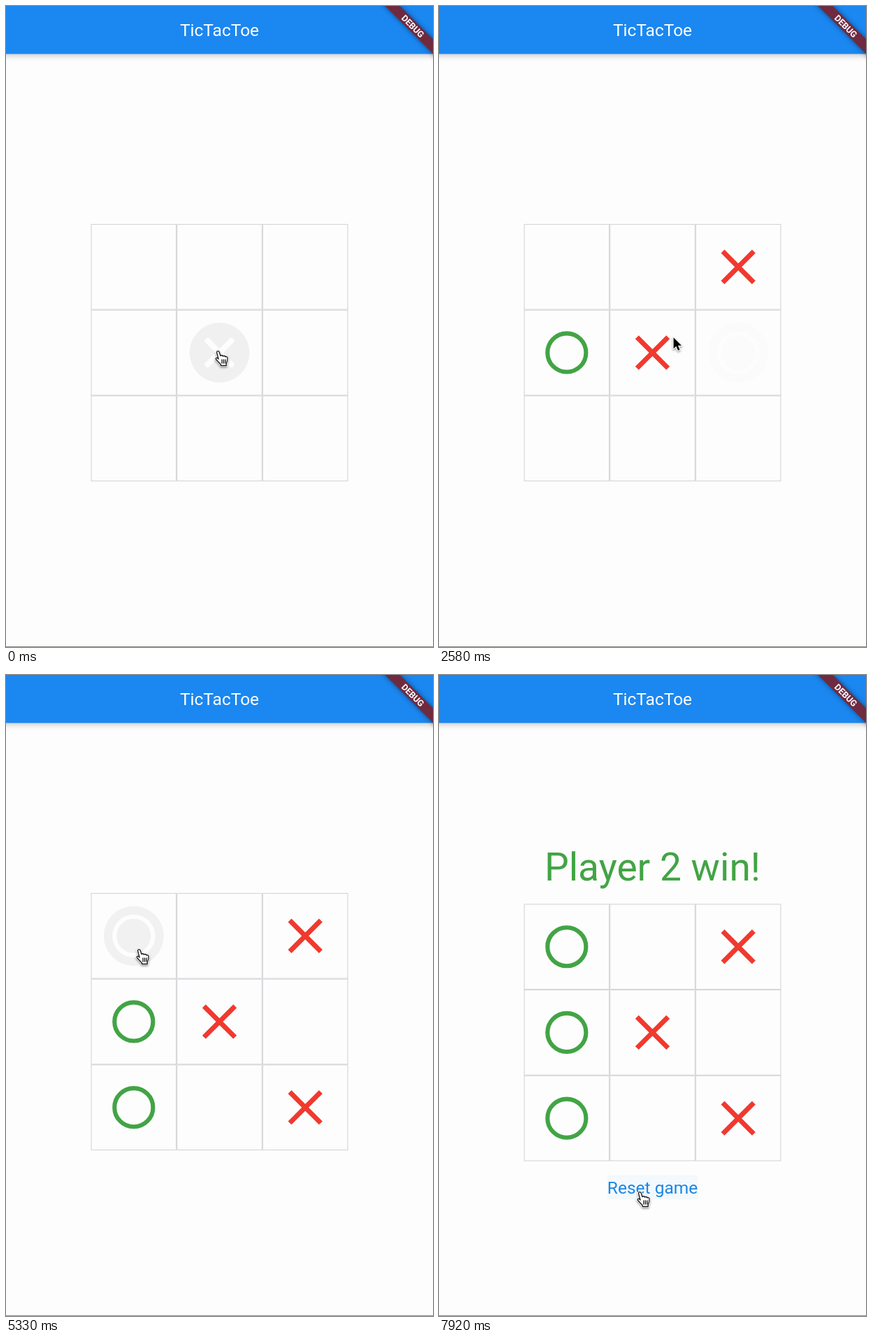
Recreate the animation shown at these times as an HTML page with a canvas. Size 611 by 917 pixels, loop 8 s.

```html
<!DOCTYPE html>
<html lang="en">
<head>
<meta charset="utf-8">
<title>TicTacToe</title>
<style>
html, body { margin: 0; width: 100%; height: 100%; overflow: hidden; background: #fdfdfd; }
canvas { display: block; }
</style>
</head>
<body>
<canvas id="stage" width="611" height="917"></canvas>
<script>
const ctx = document.getElementById('stage').getContext('2d');
const LOOP = 8000, FADE = 150, WIN = 5580;
const MID = 305.5, UNIT = 1.225, CELL = 122.7, LEFT = MID - 1.5 * CELL, TOP = 311.9;
const BG = '#fdfdfd', BLUE = '#1b87f0', RED = '#f0392f', GREEN = '#42a445';

// Moves alternate X and O: [time, cell]
const moves = [[250, 4], [1420, 3], [2250, 2], [4080, 6], [5000, 8], [WIN, 0]];

// Pointer glides between rests: [start, end, x, y]
const START = [303, 494];
const glides = [
  [380, 1000, 188, 520], [1500, 1830, 503, 393], [1920, 2170, 430, 390],
  [2330, 3000, 178, 654], [4080, 4500, 396, 640], [4500, 4750, 426, 626],
  [5000, 5250, 190, 393], [5750, 6580, 336, 298], [7000, 7760, 287, 740]
];

const hand = new Path2D('M-1.5 1.5C-1.5-.8 1.6-1 2.2 1L4 6.5C5 5.2 7 5.6 7.4 7C8.6 6 10.4 6.4 10.8 7.8' +
  'C12.4 7 14 8 14 9.6C14.2 13 13.4 15.5 12.2 17.5V20.5H4.5L4 18.5C2.5 16.5-.5 14-2.5 11.5' +
  'C-3.6 9.8-1.8 8.4-.2 9.8L1 11Z');
const knuckles = new Path2D('M6 12v5M8.5 12v5M11 12v5');
const arrow = new Path2D('M0 0V16L3.8 12.6L6.4 18.6L9 17.5L6.4 11.6H11.5Z');

// Each glide bows slightly upward, like a wrist movement
function pointerAt(t) {
  let [x, y] = START;
  for (const [from, to, x1, y1] of glides) {
    if (t < from) break;
    const k = Math.min(1, (t - from) / (to - from));
    x += (x1 - x) * k;
    y += (y1 - y) * k - 16 * Math.sin(Math.PI * k);
  }
  return [x, y];
}

// Board cell under the pointer, 'reset', or -1
function targetAt(t, board) {
  const [x, y] = pointerAt(t);
  if (t >= WIN) return Math.abs(x - MID) < 65 && Math.abs(y - 733) < 17 ? 'reset' : -1;
  const col = Math.floor((x - LEFT) / CELL), row = Math.floor((y - TOP) / CELL);
  const inside = col >= 0 && col < 3 && row >= 0 && row < 3;
  return inside && !board[row * 3 + col] ? row * 3 + col : -1;
}

// Share of the last FADE ms spent over a target gives its linear fade
function hoverLevel(t, target, board) {
  const steps = 30;
  let hits = 0;
  for (let i = 0; i < steps; i++) hits += targetAt(t - i * FADE / steps, board) === target;
  return hits / steps;
}

function disc(x, y, r) {
  ctx.beginPath();
  ctx.arc(x, y, r, 0, 2 * Math.PI);
}

function drawMark(mark, x, y, color, reach, width, cap = 'butt') {
  ctx.strokeStyle = color;
  ctx.lineWidth = width;
  ctx.lineCap = cap;
  if (mark === 'O') {
    disc(x, y, 22.5 * UNIT);
  } else {
    ctx.beginPath();
    for (const s of [-1, 1]) {
      ctx.moveTo(x - reach, y - reach * s);
      ctx.lineTo(x + reach, y + reach * s);
    }
  }
  ctx.stroke();
}

function label(text, x, y, size, color, weight = 400) {
  ctx.font = `${weight} ${size * UNIT}px Roboto, sans-serif`;
  ctx.textAlign = 'center';
  ctx.fillStyle = color;
  ctx.fillText(text, x, y);
}

function withShadow(alpha, blur, dy, draw) {
  ctx.save();
  ctx.shadowColor = `rgba(0,0,0,${alpha})`;
  ctx.shadowBlur = blur;
  ctx.shadowOffsetY = dy;
  draw();
  ctx.restore();
}

function drawChrome() {
  ctx.fillStyle = BG;
  ctx.fillRect(0, 0, 611, 917);
  ctx.fillStyle = '#8c8e84';
  ctx.fillRect(0, 916, 611, 1);
  withShadow(.22, 8, 2, () => {
    ctx.fillStyle = BLUE;
    ctx.fillRect(-20, -20, 651, 20 + 56 * UNIT);
  });
  label('TicTacToe', MID, 43, 20, '#fff');

  ctx.save();
  ctx.translate(611, 0);
  ctx.rotate(Math.PI / 4);
  withShadow(.5, 7, 0, () => {
    ctx.fillStyle = '#702a40';
    ctx.fillRect(-70, 33.6, 140, 12 * UNIT);
  });
  label('DEBUG', 0, 45.3, 10.2, '#fff', 700);
  ctx.restore();
}

function drawBoard(t, board, turn) {
  const top = TOP + (t >= WIN ? 15.5 : 0);
  for (let i = 0; i < 9; i++) {
    const x = LEFT + i % 3 * CELL, y = top + Math.floor(i / 3) * CELL;
    const cx = x + CELL / 2, cy = y + CELL / 2;
    ctx.strokeStyle = '#d6d6da';
    ctx.lineWidth = 1.1;
    ctx.strokeRect(x + .55, y + .55, CELL - 1.1, CELL - 1.1);
    if (board[i]) {
      const isX = board[i] === 'X';
      drawMark(board[i], cx, cy, isX ? RED : GREEN, 22.2, isX ? 7 : 6.1);
      continue;
    }
    const level = t < WIN ? hoverLevel(t, i, board) : 0;
    if (!level) continue;
    ctx.globalAlpha = level;
    ctx.fillStyle = '#f0f0f0';
    disc(cx, cy, 35 * UNIT);
    ctx.fill();
    ctx.globalAlpha = 1;
    drawMark(turn, cx, cy, BG, 17, turn === 'X' ? 8 : 6.1, 'round');
  }
}

function drawResult(t, board) {
  ctx.globalAlpha = hoverLevel(t, 'reset', board);
  ctx.fillStyle = '#f3f9fd';
  ctx.fillRect(MID - 65, 716, 130, 34);
  ctx.globalAlpha = 1;
  label('Player 2 win!', MID, 294, 45, GREEN);
  label('Reset game', MID, 741.5, 20, '#1b87e3');
}

function drawPointer(t, board) {
  const isHand = targetAt(t, board) !== -1;
  const shape = isHand ? hand : arrow;
  ctx.save();
  ctx.translate(...pointerAt(t));
  ctx.lineJoin = ctx.lineCap = 'round';
  ctx.strokeStyle = '#fff';
  ctx.lineWidth = isHand ? 3 : 2.4;
  withShadow(.4, 3, 1.5, () => ctx.stroke(shape));
  ctx.fillStyle = isHand ? '#fff' : '#000';
  ctx.fill(shape);
  if (isHand) {
    ctx.strokeStyle = '#111';
    ctx.lineWidth = 1.3;
    ctx.stroke(shape);
    ctx.stroke(knuckles);
  }
  ctx.restore();
}

function render(now) {
  const t = now % LOOP;
  const played = moves.filter(([time]) => time <= t);
  const board = [];
  played.forEach(([, cell], i) => board[cell] = 'XO'[i % 2]);
  drawChrome();
  drawBoard(t, board, 'XO'[played.length % 2]);
  if (t >= WIN) drawResult(t, board);
  drawPointer(t, board);
  requestAnimationFrame(render);
}
requestAnimationFrame(render);
</script>
</body>
</html>
```
